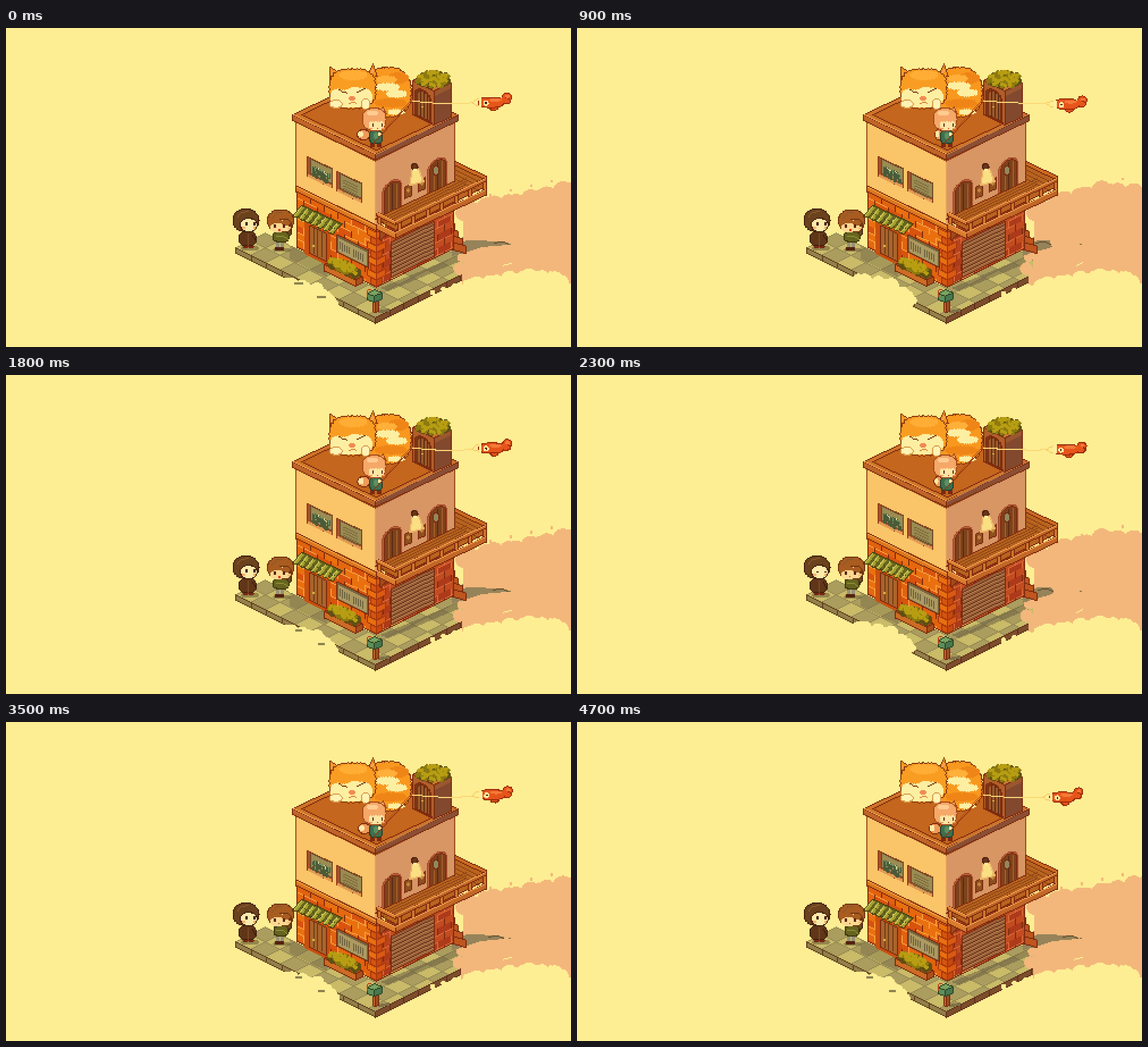
Recreate the animation shown at these times as an HTML page with a canvas. Size 996x562 px, loop 4.8 s.

```html
<!DOCTYPE html>
<html lang="en">
<head>
<meta charset="utf-8">
<title>Rooftop kite</title>
<style>
html, body { margin: 0; width: 100%; height: 100%; overflow: hidden; background: #fdee93; }
canvas { display: block; width: 996px; height: 562px; image-rendering: pixelated; }
</style>
</head>
<body>
<canvas id="stage" width="498" height="281"></canvas>
<script>
const W = 498, H = 281, TAU = Math.PI * 2;
const SKY = '#fdee93', PEACH = '#f3b77b', INK = '#7d2b0f', WOOD = '#d3772c', CREAM = '#fdefa2';
const screen = document.getElementById('stage').getContext('2d');
let g = screen, seed = 7;
const rnd = () => (seed = seed * 16807 % 2147483647) / 2147483647;
const times = (n, f) => { for (let i = 0; i < n; i++) f(i); };

// Drawing helpers: stage coordinates, snapped to a 2 px grid without smoothing
function poly(c, p) {
  g.fillStyle = c;
  const ys = p.filter((v, i) => i % 2), n = ys.length;
  for (let y = Math.floor(Math.min(...ys) / 2); y <= Math.max(...ys) / 2; y++) {
    const s = y * 2 + 1, xs = [];
    for (let i = 0, j = n - 1; i < n; j = i++)
      if ((ys[j] <= s) !== (ys[i] <= s))
        xs.push(p[2 * j] + (s - ys[j]) / (ys[i] - ys[j]) * (p[2 * i] - p[2 * j]));
    xs.sort((a, b) => a - b);
    for (let i = 0; i + 1 < xs.length; i += 2) {
      const a = Math.round(xs[i] / 2), b = Math.round(xs[i + 1] / 2);
      if (b > a) g.fillRect(a, y, b - a, 1);
    }
  }
}
function line(c, p) {
  g.fillStyle = c;
  for (let i = 0; i + 3 < p.length; i += 2) {
    const dx = p[i + 2] - p[i], dy = p[i + 3] - p[i + 1];
    const n = Math.max(1, Math.ceil(Math.max(Math.abs(dx), Math.abs(dy)) / 2));
    for (let k = 0; k <= n; k++)
      g.fillRect(Math.floor((p[i] + dx * k / n) / 2), Math.floor((p[i + 1] + dy * k / n) / 2), 1, 1);
  }
}
function shape(c, o, p) { poly(c, p); line(o, [...p, p[0], p[1]]); }

// Outlines: e below 1 makes a ring boxier
function ring(x, y, rx, ry = rx, e = 1) {
  const p = [], pow = v => Math.sign(v) * Math.abs(v) ** e;
  for (let a = 0; a < TAU; a += 0.25) p.push(x + rx * pow(Math.cos(a)), y + ry * pow(Math.sin(a)));
  return p;
}
const skew = (x, y, w, h, s) => [x, y, x + w, y + w * s, x + w, y + w * s + h, x, y + h];
const diamond = (x, y, a, b, s) => [x, y, x + a, y + a * s, x + a + b, y + (a - b) * s, x + b, y - b * s];
function fur(p, amp, step = 8) {
  const out = [], n = p.length;
  for (let i = 0; i < n; i += 2) {
    const x = p[i], y = p[i + 1], dx = p[(i + 2) % n] - x, dy = p[(i + 3) % n] - y;
    const len = Math.hypot(dx, dy) || 1, m = Math.max(1, Math.round(len / step));
    times(m, k => {
      const t = (k + 0.6) / m;
      out.push(x + dx * k / m, y + dy * k / m, x + dx * t + dy / len * amp, y + dy * t - dx / len * amp);
    });
  }
  return out;
}
const dot = (c, x, y, rx, ry) => poly(c, ring(x, y, rx, ry));
const ball = (c, o, x, y, rx, ry) => shape(c, o, ring(x, y, rx, ry));
const box = (c, x, y, w, h) => poly(c, skew(x, y, w, h, 0));

// Isometric box: x, y is the left top corner, a and b the widths of both sides
function block(x, y, a, b, h, top, left, right, s = 0.49, o = INK) {
  shape(top, o, diamond(x, y, a, b, s));
  shape(left, o, skew(x, y, a, h, s));
  shape(right, o, skew(x + a, y + a * s, b, h, -s));
}
function arch(c, o, x, y, w, h, s) {
  const p = [x, y + h];
  for (let a = 0; a <= 3.15; a += 0.314) {
    const u = w / 2 * (1 - Math.cos(a));
    p.push(x + u, y + s * u + w / 2 * (1 - Math.sin(a)));
  }
  p.push(x + w, y + s * w + h);
  shape(c, o, p);
}
function planks(c, x, y, n, gap, h, s) {
  times(n, i => line(c, [x + i * gap, y + i * gap * s, x + i * gap, y + i * gap * s + h]));
}
function slats(c, x, y, n, gap, w, s) {
  times(n, i => line(c, [x, y + i * gap, x + w, y + i * gap + w * s]));
}
function bush(x, y, rx, ry, s) {
  ['#5f4f12', '#8c7a10', '#b79d12'].forEach((c, d) => times(36, () => {
    const a = rnd() * TAU, q = Math.sqrt(rnd()), u = Math.cos(a) * q * (rx - 5);
    dot(c, x + u, y - d * 1.5 + u * s + Math.sin(a) * q * (ry - 5), 6 - d * 1.3);
  }));
}
// Row of puffs along a path, solid down to the floor
function bank(c, p, r, floor) {
  poly(c, [...p, p[p.length - 2], floor, p[0], floor]);
  for (let i = 0; i + 3 < p.length; i += 2) {
    const dx = p[i + 2] - p[i], dy = p[i + 3] - p[i + 1], n = Math.ceil(Math.abs(dx) / r);
    times(n + 1, k => dot(c, p[i] + dx * k / n, p[i + 1] + dy * k / n, r * (0.85 + 0.3 * Math.sin(k * 2.4 + i))));
  }
}
function layer(draw) {
  const c = document.createElement('canvas');
  c.width = W; c.height = H;
  g = c.getContext('2d');
  draw();
  g = screen;
  return c;
}

function drawGround() {
  times(10, i => times(10, j => {
    if (i < 7 && j > 1) return;
    const x = 405 + 26 * (i + j), y = 387 + 13 * (i - j), tile = diamond(x, y, i > 8 ? 12 : 26, 26, 0.5);
    poly((i + j) % 2 ? '#ab9d5e' : '#c9bb68', tile);
    line('#978a54', [...tile, x, y]);
  }));
  poly('rgba(100,88,62,.5)', diamond(660, 458, 14, 232, 0.42));
  poly('rgba(105,92,62,.35)', skew(500, 383, 66, 24, 0.49));
  shape('#93804a', '#62401f', skew(405, 387, 246, 9, 0.5));
  shape('#7c4e2c', '#62301a', skew(651, 510, 222, 10, -0.5));
  planks('#62401f', 432, 401, 8, 27, 8, 0.5);
  planks('#62301a', 676, 498, 8, 25, 9, -0.5);
}

function bricks(x, y, w, h, s, cols, mortar) {
  for (let r = 0; r * 12 < h; r++)
    for (let u = r % 2 ? -12 : 0; u < w; u += 24) {
      const a = Math.max(0, u), b = Math.min(w, u + 24), d = Math.min(12, h - r * 12);
      const q = skew(x + a, y + a * s + r * 12, b - a, d, s);
      poly(cols[Math.floor(rnd() * cols.length)], q);
      if (rnd() < 0.55) line(mortar, q.slice(0, 4));
      line(rnd() < 0.5 ? mortar : INK, [q[0], q[1], q[6], q[7]]);
    }
}

function drawShop() {
  times(4, k => shape('#c0561f', INK, skew(780, 342 + 11 * k, 10 + 7 * k, 13, 0.3)));
  bricks(513, 288, 139, 99, 0.49, ['#e2620f', '#ea700f', '#e5680f', '#d9530f'], '#f6a13f');
  bricks(652, 357, 136, 98, -0.49, ['#b8431c', '#c24c20', '#ad3a1a'], '#d96a38');
  times(8, k => {
    const w = k % 2 ? 10 : 16;
    shape(k % 2 ? '#d4560f' : '#e8700f', '#a8380d', skew(652 - w, 360 - w * 0.49 + 12 * k, w, 11, 0.49));
    shape(k % 2 ? '#c8480f' : '#da5a14', '#a8380d', skew(652, 360 + 12 * k, w, 11, -0.49));
  });
  line(INK, [513, 288, 513, 387, 652, 456, 788, 389, 788, 300]);
  shape('#99603a', INK, skew(679, 377, 75, 62, -0.49));
  slats('#66361e', 680, 383, 8, 7, 73, -0.49);
  slats('#b87a48', 680, 385, 8, 7, 73, -0.49);
  poly('rgba(110,30,15,.45)', skew(662, 355, 126, 18, -0.47));

  poly('#c9500f', skew(526, 340, 46, 58, 0.49));
  shape('#a9652b', INK, skew(535, 348, 29, 49, 0.49));
  planks('#713c17', 542, 353, 3, 7, 44, 0.49);
  dot('#d6b13f', 542, 384, 2);
  shape('#66641f', '#49400f', [520, 312, 592, 345, 578, 360, 506, 330]);
  times(7, k => times(2, r => {
    const x = 519 + 10.6 * k - 6 * r, y = 315 + 4.9 * k + 8 * r;
    poly('#a5a12f', [x, y, x + 6, y + 2, x - 1, y + 10, x - 7, y + 7]);
    line('#d2cc62', [x + 1, y, x - 5, y + 7]);
    line('#49470f', [x - 7, y + 8, x, y + 11]);
  }));
  shape('#77623c', INK, skew(582, 364, 56, 31, 0.49));
  poly('#ad9a61', skew(586, 370, 49, 24, 0.49));
  times(11, k => {
    const x = 589 + 4 * k, y = 376 + 2 * k;
    if (k % 6 !== 5) line('#6c6140', [x, y + rnd() * 3, x, y + 12 + rnd() * 4]);
  });
  block(560, 417, 56, 13, 11, '#a8511c', '#cd6c24', '#a8511c');
  bush(596, 423, 32, 14, 0.38);
}

function drawWalls() {
  block(510, 165, 141, 140, 112, '#c4661d', '#fac568', '#d79664', 0.49, '#9c4a1c');
  line('#e7a261', [651, 236, 651, 345]);
  shape('#dc771f', INK, skew(510, 278, 142, 10, 0.49));
  line('#f6a13f', [512, 281, 650, 349]);
  times(2, i => {
    const x = 530 + 52 * i, y = 226 + 26 * i;
    shape('#a8522a', '#8b3a1a', skew(x, y, 45, 34, 0.48));
    poly('#e39a52', skew(x + 2, y + 31, 42, 5, 0.48));
    shape('#9b8c52', '#6f4a2a', skew(x + 7, y + 5, 37, 26, 0.48));
  });
  slats('#7e6b3e', 594, 268, 5, 5, 24, 0.48);
  times(2, i => {
    const x = 663 + 80 * i, y = 279 - 39 * i, h = 53 + 4 * i;
    arch('#b75f3c', '#a64d2a', x - 1, y - 1, 36, h + 2, -0.49);
    arch('#7d421c', INK, x + 3, y, 30, h, -0.49);
    planks('#a5602a', x + 11, y + 2, 2, 14, 44, -0.49);
    planks('#592b12', x + 18, y - 4, 1, 1, 46, 0);
    shape('#8d501f', INK, skew(703 + 24 * i, 280 - 12 * i, 12, 20, -0.4));
    dot('#c3843c', 709 + 24 * i, 286 - 12 * i, 3, 4);
  });
  ball('#91895a', INK, 758, 251, 6, 8);
  poly('#edb869', [715, 250, 728, 248, 738, 271, 710, 279]);
  poly('#fbdf83', [717, 251, 727, 249, 733, 270, 713, 275]);
  ball('#6b3518', '#4f2010', 720, 244, 6, 5);
  dot('#fff0a0', 721, 250, 4, 2);
}

function drawBalcony() {
  const s = -0.475;
  shape('#b9641f', INK, [651, 336, 791, 270, 791, 240, 844, 265, 844, 280, 686, 356]);
  slats('#8d4516', 791, 250, 3, 8, 42, 0.48);
  slats('#8d4516', 660, 337, 3, 5, 150, s);
  times(7, k => shape(WOOD, INK, skew(690 + 25 * k, 340 + 25 * k * s, 6, 18, s)));
  shape('#cd6d22', INK, skew(791, 235, 55, 7, 0.48));
  shape(WOOD, INK, skew(654, 328, 6, 18, 0.5));
  [[324, 7], [344, 11]].forEach(([y, h]) => {
    shape('#db7d2d', INK, skew(652, y, 34, h, 0.49));
    shape('#c26727', INK, skew(686, y + 16, 160, h - 1, s));
    line('#eda050', [653, y + 1, 686, y + 17, 845, y + 17 + 159 * s]);
  });
  shape('#a24a1c', INK, [658, 357, 670, 363, 660, 374]);
}

function drawRoof() {
  block(505, 153, 146, 145, 10, '#cf7529', '#bf6528', '#8a4f34', 0.476);
  shape('#c4661d', INK, diamond(521, 153, 131, 128, 0.476));
  line('#eda04c', [507, 153, 651, 221]);
  line('#c87a42', [652, 222, 794, 153]);
  block(716, 93, 38, 31, 60, '#c8762f', '#b15f2a', '#82492f');
  poly('#9b572f', skew(755, 112, 29, 8, -0.49));
  arch('#7a3c17', INK, 720, 102, 30, 51, 0.49);
  arch('#9b5a2a', INK, 724, 106, 24, 48, 0.49);
  planks('#5f2b12', 730, 111, 3, 6, 44, 0.49);
  dot('#d9b344', 733, 139, 2);
  bush(753, 92, 33, 18, 0);
}

function drawMailbox() {
  poly('#7f7147', skew(655, 498, 20, 5, -0.2));
  block(646, 480, 5, 5, 19, '#b8652a', '#c9732c', '#9c4f22');
  block(636, 467, 13, 14, 11, '#7aa562', '#5f8f58', '#47784f', 0.42, '#2e4426');
  line('#c23f1a', [637, 472, 637, 462, 643, 460]);
}

function drawPeach(k) {
  const d = 8 * k;
  bank(PEACH, [806, 326, 860, 313 - d, 925, 303 - 2 * d, 996, 284 + d], 16, 460);
  bank(PEACH, [812 - d, 396, 870, 400, 960, 400], 11, 450);
  bank(PEACH, [804 - d, 404, 800 - d, 424, 816 - d, 436, 850, 430], 10, 455);
  times(4, i => dot(PEACH, 854 + 36 * i, 294 - 8 * i - d / 2, 3));
  // Pavement left clear between the clouds
  const e = 888 - 54 * k;
  poly('#96835a', [786, 386, 812, 374, 834, 374, e, 378, e, 382, 838, 386, 806 - d, 397, 786, 402]);
  line('#65502e', [e - 26, 379, e - 10, 376, e, 381]);
  dot('#82744e', 888, 381, 2, 1);
}

function drawFoam(k) {
  const d = 6 * k;
  bank(SKY, [784, 470, 830, 452, 922, 437, 968, 443, 998, 462], 13, 520);
  times(4, i => dot(SKY, 752 + 19 * i, 466 - 6 * i + d / 3, 5 - i / 2));
  dot(SKY, 960, 432, 4);
  line(SKY, [876 + d, 418, 890, 415 - d / 3]);
  // Bank over the near pavement
  bank(SKY, [496, 449 - d, 548 + d, 460 - d, 580 + 2 * d, 486 - d], 10 + d / 3, 520);
  const fade = 1 - k;
  dot(SKY, 560, 465 - d, 6);
  dot('#8e8250', 516, 450, 8 * fade, 3 * fade);
  dot('#8e8250', 556, 474, 8 * fade, 3 * fade);
  dot(SKY, 504, 378 - d / 3, 6);
}

function drawCat(k) {
  const ink = '#8a3a10', b = 2 * k;
  const tuft = (c, x, y, rx, ry) => poly(c, fur(ring(x, y, rx, ry), 2, 6));
  shape('#f8981f', ink, fur(ring(672, 113, 42, 43, 0.85), 2));
  tuft('#ef8516', 692, 88, 18, 9);
  tuft('#ffb03a', 672, 91 - b, 17, 6);
  tuft(CREAM, 672, 104 - b, 21, 6);
  tuft(CREAM, 688, 116 - b, 18, 6);
  tuft('#ef8516', 678, 132 + b / 2, 28, 7);
  tuft(CREAM, 688, 148, 14, 4);
  for (const [x, t, y] of [[574, 571, 68], [636, 647, 62]]) {
    shape('#f8981f', ink, [x - 3, 94, t, y, x + 18, 84]);
    poly('#f4a35a', [x + 2, 86, t + 2, y + 6, x + 10, 83]);
  }
  shape('#f99d22', ink, fur(ring(611, 107, 40, 34, 0.7), 2));
  tuft('#ffad35', 612, 83, 24, 8);
  poly(CREAM, fur(ring(609, 122, 36, 17, 0.7), 2));
  tuft('#f99d22', 594, 102, 14, 6);
  tuft('#f99d22', 634, 98, 14, 6);
  line('#7a330f', [587, 108, 593, 113, 601, 114]);
  line('#7a330f', [618, 113, 625, 111, 633, 106]);
  dot('#f18a52', 610, 124, 6, 4);
  line('#d9823c', [604, 133, 610, 130, 617, 132]);
  ball('#fff3b4', '#d89a4a', 582, 134, 11, 7);
  ball('#fff3b4', '#d89a4a', 634, 134, 8, 9);
}

function drawGirl(k) {
  const x = 630 + 8 * k, hair = '#f5a868';
  ball('#ef9a58', INK, x, 188, 11 - 4 * k, 9);
  dot('#fdeaa6', x - 5 + 2 * k, 187, 5 - 2 * k, 6);
  times(2, i => box('#7c2a12', 642 + 11 * i, 203, 8, 7));
  shape('#3f6f4f', '#22402c', ring(652, 192, 11, 12, 0.7));
  dot('#5c9060', 652, 190, 4, 6);
  shape(hair, '#a34a1c', [658, 148, 664, 138, 671, 150]);
  shape(hair, '#a34a1c', ring(649, 161, 21, 20, 0.85));
  dot('#ffcb90', 646, 150, 11, 5);
  dot('#fde5a4', 653, 171, 14, 10);
  poly(hair, fur(ring(653, 161, 15, 3), 2, 5));
  times(2, i => {
    box('#5c2410', 645 + 16 * i, 168, 3, 6);
    dot('#f39a62', 643 + 21 * i, 177, 3, 2);
  });
  box('#c84a20', 653, 176, 3, 3);
  line('#8f3410', [648, 202, 716, 128]);
  line('#b9531c', [658, 189, 716, 126]);
  dot('#fde5a4', 658, 187, 3);
}

function drawFish(p, k) {
  const x = 833 + 8 * k, y = 132 - 4 * Math.cos((p - 3.5) / 16 * TAU), wag = 2 * Math.sin((p - 2) / 16 * TAU);
  const red = '#e6551a', ink = '#9a2b0c', end = x - 13, knot = 132 + (y - 132) / 4, cord = [];
  for (let t = 0; t <= 1.01; t += 0.1)
    cord.push(716 + (end - 716) * t, 128 + (knot - 128) * t + 12 * t * (1 - t) * (1 - 0.5 * k));
  line('#fbd978', cord);
  for (const d of [-6, 6]) line('#f6cc68', [end, knot, end + 8, y + d * 0.8, x + 2, y + d]);
  ball(red, ink, x + 50, y - 8 + wag, 8, 7);
  ball(red, ink, x + 48, y - 1 + wag, 8, 5);
  ball(red, ink, x + 27, y + 9, 7, 5);
  shape(red, ink, ring(x + 22, y, 22, 9, 0.75));
  dot(red, x + 44, y - 3 + wag / 2, 7, 5);
  dot('#f57a38', x + 29, y - 4, 11, 3);
  dot('#f57a38', x + 51, y - 9 + wag, 4, 3);
  box(CREAM, x, y - 7, 5, 14);
  dot(CREAM, x + 13, y + 1, 5);
  dot('#4b1a0c', x + 13, y + 1, 2);
}

function person(x, y, hair, ink, skin, shut) {
  shape(hair, ink, ring(x, y, 23, 20, 0.9));
  line('#8a5a2c', [x - 15, y - 6, x - 8, y - 14, x + 3, y - 16]);
  ball(skin, ink, x + 5, y + 8, 15, 12);
  times(2, i => {
    box(ink, x - 2 + 15 * i, y + (shut ? 8 : 4), 4, shut ? 2 : 6);
    dot('#f6b26c', x - 4 + 19 * i, y + 13, 3, 2);
  });
}

function drawFriends(n) {
  const blink = n > 21 && n < 25, talk = n % 8 < 3, arm = talk ? 2 : 0;
  dot('rgba(95,82,50,.5)', 430, 388, 17, 5);
  times(2, i => dot('#7a2612', 422 + 10 * i, 385, 5, 4));
  shape('#603619', '#43200f', ring(426, 371, 15, 13, 0.75));
  line('#7d4a26', [427, 362, 427, 382]);
  line('#3f1c0e', [434, 364, 439 + arm, 374]);
  person(423, 339, '#6a421d', '#43200f', '#fdebaa', blink);

  dot('rgba(95,82,50,.5)', 486, 391, 16, 4);
  times(2, i => {
    box('#969176', 475 + 8 * i, 376, 7, 11);
    box('#54220f', 473 + 9 * i, 386, 8, 7);
  });
  ball('#6a4a20', '#43200f', 496, 358, 7, 9);
  shape('#66641f', '#3f370e', ring(485, 368, 13 + arm / 2, 9, 0.7));
  line('#8d8c32', [477, 366, 491, 368, 495 + arm, 372]);
  person(484, 340, '#a85c20', '#713411', '#fcd891', false);
  dot('#a85c20', 493, 343, 8, 5);
  dot('#a85c20', 478, 341, 9, 4);
  // Face turned to the other person
  dot('#fcd891', 479, 352, 13, 8);
  times(2, i => box('#54220f', 472 + 16 * i, 346, 3, 6));
  box(talk ? '#d73a16' : '#a9562a', 479, 354, talk ? 5 : 3, talk ? 5 : 2);
}

function drawPlant(k) {
  times(5, i => {
    const x = 543 + 6 * i, y = 244 + 3 * i, d = Math.sin(i * 2 + k * 3) * 2;
    dot('#4a5a38', x + d, y + 5, 4, 6);
    dot('#4a5a38', x - d, y + 14, 3, 5);
    line(i % 2 ? '#d8dca0' : '#68996a', [x + d, y, x + 3 - d, y + 6]);
  });
}

const ground = layer(drawGround);
const house = layer(() => {
  drawShop();
  drawWalls();
  drawBalcony();
  drawRoof();
  drawMailbox();
});

// Wind, kite and clouds share a swing of 16 steps
function render(n) {
  const p = n % 16, k = (1 - Math.cos((p - 0.7) / 16 * TAU)) / 2;
  g.fillStyle = SKY;
  g.fillRect(0, 0, W, H);
  g.drawImage(ground, 0, 0);
  drawPeach(k);
  drawFoam(k);
  g.drawImage(house, 0, 0);
  drawPlant(k);
  drawCat(k);
  drawGirl(k);
  drawFish(p, k);
  drawFriends(n);
}

let last = -1;
function tick(now) {
  const n = Math.floor(now / 100) % 48;
  if (n !== last) render(last = n);
  requestAnimationFrame(tick);
}
render(0);
requestAnimationFrame(tick);
</script>
</body>
</html>
```
